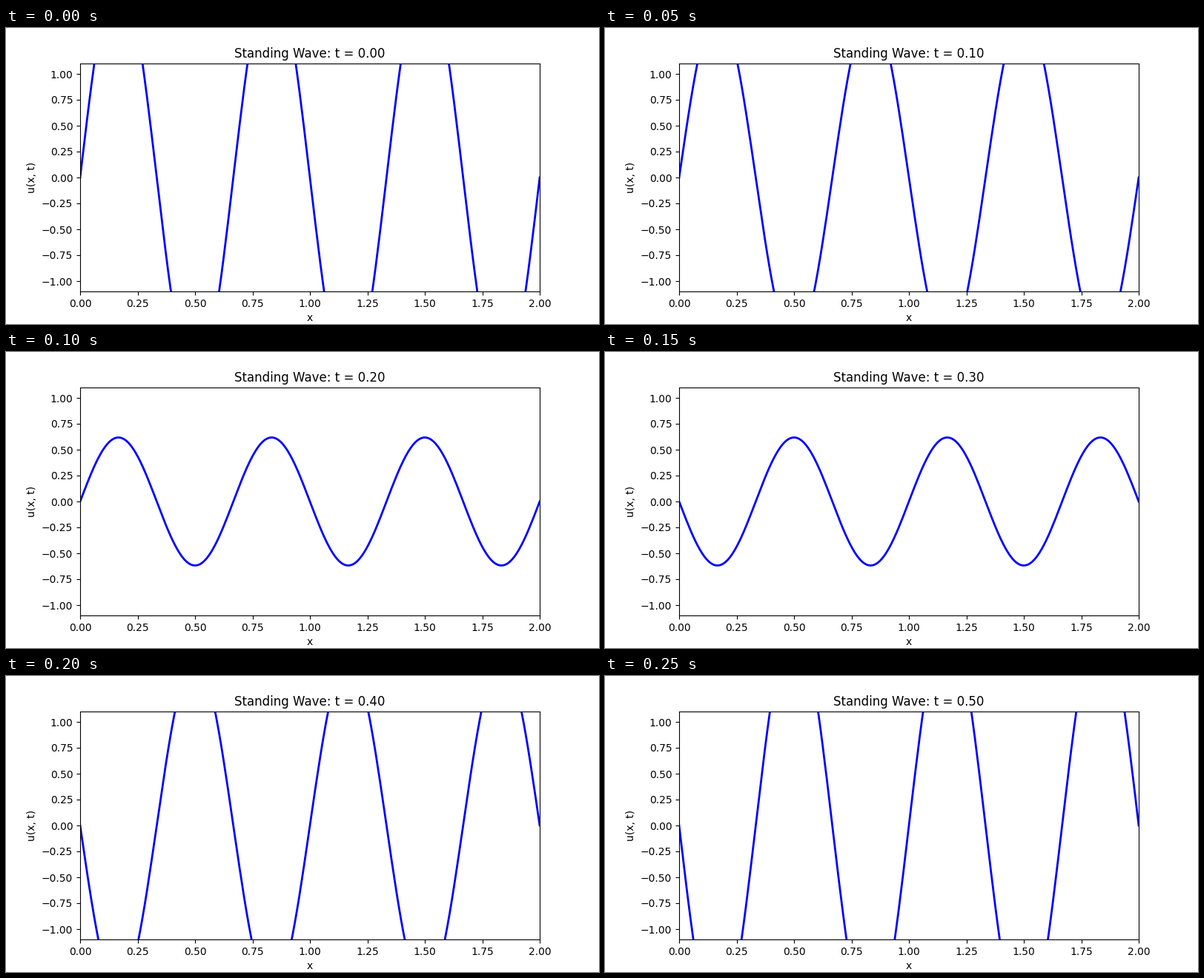
These frames come from a looping animation (800x400 px, 0.3 s). A matplotlib script:

```python
import matplotlib.pyplot as plt
import numpy as np
from matplotlib.animation import FuncAnimation

LENGTH = 2.0
AMPLITUDE = 2.0
MODE = 6
FREQUENCY = 1.0
TIME_STEP = 0.1
FRAMES = 6

x = np.linspace(0, LENGTH, 200)


def wave(t):
    """Displacement of a string fixed at both ends."""
    shape = np.sin(MODE * np.pi * x / LENGTH)
    return AMPLITUDE * shape * np.cos(2 * np.pi * FREQUENCY * t)


fig, ax = plt.subplots(figsize=(8, 4), dpi=100)
line, = ax.plot(x, wave(0), color="blue", lw=2)
ax.set_xlim(0, LENGTH)
ax.set_ylim(-1.1, 1.1)
ax.set_xlabel("x")
ax.set_ylabel("u(x, t)")
title = ax.set_title("Standing Wave: t = 0.00")


def update(frame):
    t = frame * TIME_STEP
    line.set_ydata(wave(t))
    title.set_text(f"Standing Wave: t = {t:.2f}")
    return line, title


anim = FuncAnimation(fig, update, frames=FRAMES, interval=50, repeat=True)
plt.show()
```
